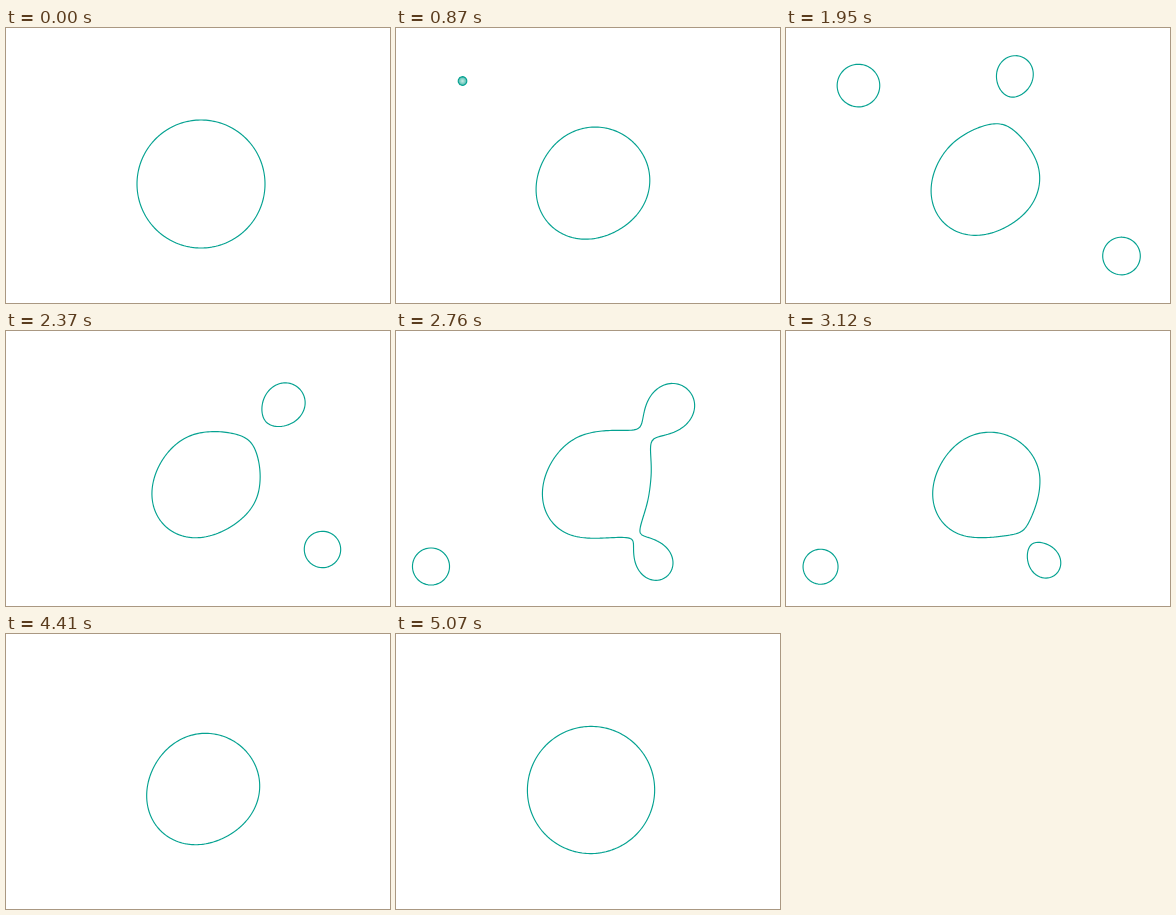
Recreate the animation shown at these times as an HTML page with a canvas. Size 384x275 px, loop 5.1 s.

```html
<!DOCTYPE html>
<html lang="en">
<head>
<meta charset="utf-8">
<title>Droplets</title>
<style>
  html, body { margin: 0; width: 100%; height: 100%; overflow: hidden; background: #fff; }
  canvas { display: block; }
</style>
</head>
<body>
<canvas id="stage" width="384" height="275"></canvas>
<script>
const W = 384, H = 275, LOOP = 5100, TICK = 30, CELL = 2;
const RETURN = 720, SOFT = 70, TEAL = '#05a291';
const ctx = document.getElementById('stage').getContext('2d');

// Each drop pops up at its first stop, visits the others between go and leave,
// then falls back into the body. Its size drifts from one value to the other.
const drops = [
  { born: 840, go: 1540, leave: 1540, size: [20, 22], stops: [[66.5, 53]] },
  { born: 1440, go: 1680, leave: 2360, size: [18, 24.5], stops: [[202.7, 31.5], [279.2, 71.8]] },
  { born: 1440, go: 1980, leave: 2760, size: [20.2, 11.2], stops: [[335.5, 228], [316.5, 218.5], [260.3, 232.8]] },
  { born: 2650, go: 3080, leave: 3080, size: [18.5, 22.5], stops: [[35, 235.5]] }
];

const clamp = v => Math.min(1, Math.max(0, v));
const mix = (a, b, u) => a + (b - a) * u;
const smooth = u => u * u * (3 - 2 * u);
const windUp = u => u * u * (2 * u - 1);
const pop = age => 1 - Math.exp(-age / 200) * Math.cos(2 * Math.PI * age / 440);

// The body tightens and leans to the upper right, then relaxes into a circle.
function bodyAt(t) {
  const s = (1 - Math.exp(-t / 800)) * Math.sin(Math.PI / 2 * clamp((LOOP - t) / 1400));
  return {
    x: 195 + 5 * s ** 3,
    y: 156 - 2.2 * s ** 3,
    radius: th => 64 - 11.7 * s + s * (3.6 * Math.cos(2 * th + 1.4) + 1.1 * Math.cos(3 * th - 0.6))
  };
}

function dropAt({ born, go, leave, size, stops }, t, body) {
  const legs = stops.length - 1;
  const way = legs * clamp((t - go) / (leave - go || 1));
  const leg = Math.max(0, Math.min(legs - 1, Math.floor(way)));
  const from = stops[leg], to = stops[Math.min(legs, leg + 1)];
  const hop = smooth(way - leg);
  const back = clamp((t - leave) / RETURN), home = windUp(back);
  const life = (t - born) / (leave + RETURN - born);
  return {
    x: mix(mix(from[0], to[0], hop), body.x, home),
    y: mix(mix(from[1], to[1], hop), body.y, home),
    r: mix(size[0], size[1], life * life) * pop(t - born),
    soft: SOFT * (1 - back ** 16)
  };
}

function blend(a, b, k) {
  const h = Math.max(k - Math.abs(a - b), 0) / k;
  return Math.min(a, b) - h * h * k / 4;
}

const cols = W / CELL + 1, rows = Math.ceil(H / CELL) + 1;
const field = new Float32Array(cols * rows);

// Signed distance to the outline of body and drops together.
function fillField(body, live) {
  for (let j = 0; j < rows; j++) {
    for (let i = 0; i < cols; i++) {
      const x = i * CELL, y = j * CELL, dx = x - body.x, dy = y - body.y;
      let v = Math.hypot(dx, dy) - body.radius(Math.atan2(dy, dx));
      for (const d of live) v = blend(v, Math.hypot(x - d.x, y - d.y) - d.r, d.soft);
      field[j * cols + i] = v;
    }
  }
}

// Marching squares along the zero line.
function traceField() {
  const corners = [[0, 0], [1, 0], [1, 1], [0, 1]];
  ctx.beginPath();
  for (let j = 0; j < rows - 1; j++) {
    for (let i = 0; i < cols - 1; i++) {
      const at = j * cols + i;
      const v = [field[at], field[at + 1], field[at + cols + 1], field[at + cols]];
      const inside = v.filter(n => n < 0).length;
      if (inside === 0 || inside === 4) continue;
      const hits = [];
      for (let e = 0; e < 4; e++) {
        const n = (e + 1) % 4;
        if (v[e] < 0 === v[n] < 0) continue;
        const u = v[e] / (v[e] - v[n]), a = corners[e], b = corners[n];
        hits.push([(i + mix(a[0], b[0], u)) * CELL, (j + mix(a[1], b[1], u)) * CELL]);
      }
      hits.forEach((p, n) => n % 2 ? ctx.lineTo(...p) : ctx.moveTo(...p));
    }
  }
  ctx.stroke();
}

// Newborn drops are tinted until they open up.
function tint({ x, y, r }) {
  const g = ctx.createRadialGradient(x, y, 0, x, y, r);
  g.addColorStop(0, '#c5ebe5');
  g.addColorStop(1, '#4dbbae');
  ctx.globalAlpha = clamp((12 - r) / 6);
  ctx.fillStyle = g;
  ctx.beginPath();
  ctx.arc(x, y, r, 0, 2 * Math.PI);
  ctx.fill();
  ctx.globalAlpha = 1;
}

function draw(t) {
  ctx.fillStyle = '#fff';
  ctx.fillRect(0, 0, W, H);
  const body = bodyAt(t);
  const live = drops
    .filter(d => t > d.born && t < d.leave + RETURN)
    .map(d => dropAt(d, t, body));
  live.forEach(tint);
  fillField(body, live);
  ctx.strokeStyle = TEAL;
  ctx.lineWidth = 1.15;
  ctx.lineCap = 'round';
  traceField();
}

const start = performance.now();
let shown = -1;
function tick() {
  const t = Math.floor((performance.now() - start) % LOOP / TICK) * TICK;
  if (t !== shown) draw(shown = t);
  requestAnimationFrame(tick);
}
tick();
</script>
</body>
</html>
```
